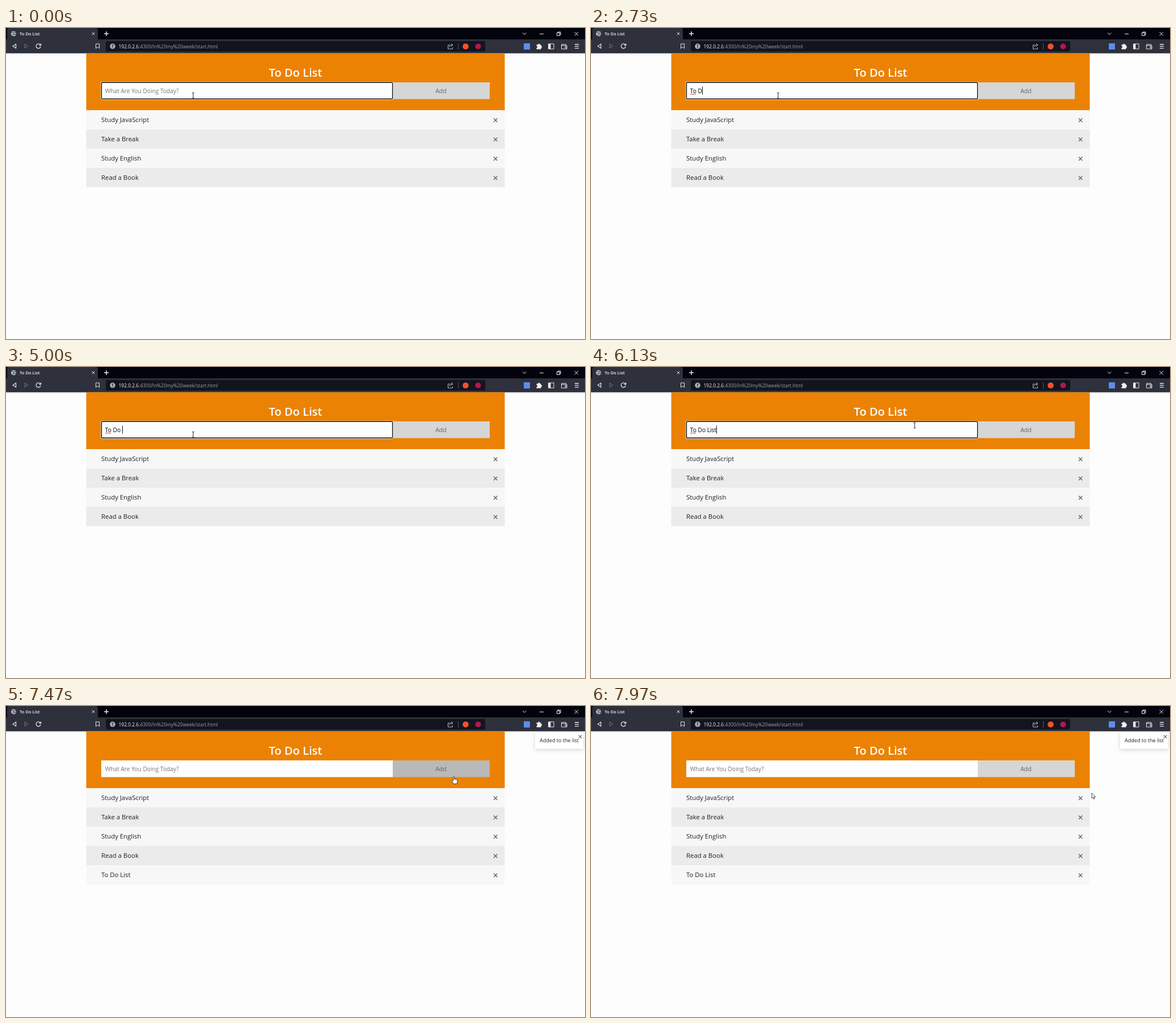
These frames come from a looping animation (1021x549 px, 8000 ms). An HTML page:

```html
<!DOCTYPE html>
<html lang="en">
<head>
<meta charset="utf-8">
<title>To Do List</title>
<style>
  html, body { margin: 0; width: 100%; height: 100%; overflow: hidden; background: #fdfdfd; }
  svg { display: block; width: 100%; height: 100%; font-family: "Open Sans", "Noto Sans", sans-serif; }
  text { white-space: pre; }
  .line { fill: none; stroke: #e8e8ec; stroke-width: 1; }
  .item { font-size: 11.35px; fill: #202124; }
  .field { font-size: 10.2px; }
  .cross { fill: none; stroke: #666; stroke-width: 1.4; }
  .hint { fill: #757575; }
</style>
</head>
<body>
<svg viewBox="0 0 1021 549">
  <defs>
    <clipPath id="page"><rect y="45" width="1021" height="504"/></clipPath>
    <filter id="shade" x="-20%" y="-40%" width="140%" height="200%">
      <feDropShadow dx="0" dy="2" stdDeviation="3" flood-color="#555" flood-opacity=".25"/>
    </filter>
  </defs>
  <rect width="1021" height="549" fill="#fdfdfd"/>

  <g id="chrome">
    <rect width="1021" height="21" fill="#02030d"/>
    <path d="M2 20V4q0-4 4-4H158q4 0 4 4V20Z" fill="#2e303c"/>
    <rect y="20" width="1021" height="24.7" fill="#2e303c"/>
    <rect x="176" y="23" width="669" height="18.5" rx="2" fill="#13151e"/>
    <circle cx="13.5" cy="10" r="4.6" fill="#c4c6cb"/>
    <path d="M10 8l3 .5 1 2-2 1.500 0 2M14 6l1 2 3 .5M15 13l1-2 2 0" fill="none" stroke="#50535d" stroke-width="1.300"/>
    <text x="24" y="13" font-size="7.6" font-weight="600" fill="#f4f4f6">To Do List</text>
    <path class="line" d="M151.700 7.700l4.600 4.600m0-4.600l-4.600 4.600" stroke-width="1.200"/>
    <path class="line" d="M177 6v8m-4-4h8" style="stroke-width:1.500"/>
    <path class="line" d="M911 8.500l3.200 3 3.200-3M941 10.500h7M1002.500 7l6.500 6.500m0-6.500l-6.500 6.500"/>
    <path class="line" d="M971.500 8.500h5v5h-5ZM973 8.500v-1.500h5v5h-1.500"/>
    <path class="line" d="M17.500 28.300v7.400l-5.500-3.700Z" style="stroke-width:1.200"/>
    <path class="line" d="M33 28.300v7.400l5.500-3.700Z" style="stroke:#777a84"/>
    <path class="line" d="M60.300 29.500a4 4 0 1 0 .7 3.500M61.500 27.500v3h-3" style="stroke-width:1.300"/>
    <path class="line" d="M158.500 28h6v8l-3-2.500-3 2.500Z"/>
    <circle cx="188" cy="32.300" r="4.800" fill="#a9abb3"/>
    <path d="M188 29.300v3.700m0 1v1.200" stroke="#13151e" stroke-width="1.300"/>
    <text x="198.500" y="35.500" font-size="8.45" fill="#f1f1f4">192.0.2.6<tspan fill="#9c9ea6">:4300/In%20my%20week/start.html</tspan></text>
    <path class="line" d="M783 30h-3.500v7h8v-3M782 34c0-3 2-4 5-4m-2-2.500l3 2.500-3 2.500" style="stroke:#b9bac1"/>
    <path d="M797.500 27v11" stroke="#555863"/>
    <circle cx="810.500" cy="32.500" r="5.300" fill="#f4512c"/>
    <circle cx="832.500" cy="32.500" r="5" fill="#b5174f"/>
    <rect x="913" y="27" width="11" height="11" rx="1" fill="#5b8def"/>
    <path d="M935.500 29.500h2.500a1.700 1.700 0 1 1 3.400 0h2.100v2.200a1.700 1.700 0 1 1 0 3.400v2.400h-8v-2.500a1.600 1.600 0 1 0 0-3.200Z" fill="#f2f2f4"/>
    <path class="line" d="M956.500 28h9.500v9h-9.500Z"/>
    <path d="M956.500 28h4v9h-4Z" fill="#e8e8ec"/>
    <path class="line" d="M979.500 29h8v2h1.500v6h-9.500ZM979.500 31h8M989 33h-3v2.200h3"/>
    <path class="line" d="M1003 29h7M1003 32.300h7M1003 35.600h7" style="stroke-width:1.300"/>
  </g>

  <g id="header">
    <rect x="141.500" y="44.700" width="738" height="100.300" fill="#eb8203"/>
    <text x="510.500" y="86" font-size="20.100" font-weight="600" text-anchor="middle" fill="#fff">To Do List</text>
    <rect x="168" y="96" width="514" height="29.500" fill="#fefefe"/>
    <rect id="button" x="682" y="96" width="171" height="29.500"/>
    <text x="767" y="114.700" font-size="10.600" text-anchor="middle" fill="#666">Add</text>
    <g id="ring" fill="none">
      <rect x="167.300" y="95.300" width="515.400" height="31" rx="2" stroke="#fff"/>
      <rect x="168.400" y="96.300" width="513.200" height="28.900" rx="1.500" stroke="#101010" stroke-width="1.400"/>
    </g>
    <text id="typed" class="field" x="174.800" y="114.700"></text>
    <path id="spell" d="M175 116.600l1 .6 1-.6 1 .6 1-.6 1 .6 1-.6 1 .6 1-.6 1 .6 1-.6" fill="none" stroke="#e0343c" stroke-width="1"/>
    <rect id="caret" y="103.500" width="1" height="14" fill="#111"/>
  </g>

  <g id="list"></g>

  <g clip-path="url(#page)">
    <g id="toast">
      <rect x="933" y="46" width="85" height="29.500" rx="1" fill="#fff" filter="url(#shade)"/>
      <text x="941" y="64" font-size="9.050" fill="#222">Added to the list</text>
      <path class="cross" d="M1009.800 51.500l5.600 5.600m0-5.600l-5.600 5.600" style="stroke-width:1.100"/>
    </g>
  </g>

  <g id="pointer">
    <path id="beam" d="M-2-4.500h1.500l.5.500.5-.5h1.500M0-4v8.500M-2 5h1.500l.5-.5.5.5h1.500" fill="none" stroke="#222"/>
    <path id="arrow" d="M0 0v9.500l2.200-2 1.500 3.300 1.500-.7-1.500-3.200h2.900Z" fill="#fff" stroke="#222" stroke-width=".8"/>
    <path id="hand" d="M-1.300 7V.8q0-1.100 1-1.100t1 1.100V4l1.500.2 1.500.4 1.300.5q1 .3 1 1.400v2.500l-1 3.500h-5.300l-3.400-4.500q-.5-1 .4-1.400t1.700.6Z" fill="#fff" stroke="#222" stroke-width=".9"/>
  </g>
</svg>
<script>
  const LOOP = 8000, PRESS = 6880, ADD = 7040;
  const $ = id => document.getElementById(id);
  const show = (id, on) => $(id).setAttribute("visibility", on ? "visible" : "hidden");

  const items = ["Study JavaScript", "Take a Break", "Study English", "Read a Book", "To Do List"];
  $("list").innerHTML = items.map((name, i) => {
    const y = 145 + i * 34;
    return `<g id="row${i}"><rect id="bg${i}" x="141.5" y="${y}" width="738" height="34"/>
      <text class="item" x="168" y="${y + 21}">${name}</text>
      <path class="cross" d="M860 ${y + 14.5}l6.400 6.400m0-6.400l-6.400 6.400"/></g>`;
  }).join("");

  // Time of each keystroke of "To Do List"
  const phrase = "To Do List";
  const keys = [600, 1000, 2050, 2400, 3430, 3650, 5300, 5500, 5680, 5840];

  // Pointer path: time, x, y
  const path = [
    [5900, 330, 119], [6130, 570, 103], [6270, 670, 82], [6430, 752, 104],
    [6640, 790, 125], [7510, 790, 125], [7620, 851, 152], [7680, 855, 153], [7800, 883, 153.5]
  ];

  function pointerAt(t) {
    let a = path[0];
    for (const b of path) {
      if (t < b[0]) {
        const k = b === a ? 0 : (t - a[0]) / (b[0] - a[0]);
        return [a[1] + (b[1] - a[1]) * k, a[2] + (b[2] - a[2]) * k];
      }
      a = b;
    }
    return [a[1], a[2]];
  }

  const inside = ([x, y], l, t, r, b) => x >= l && x < r && y >= t && y < b;

  function drawField(t) {
    const added = t >= ADD, focused = t < PRESS;
    const count = keys.filter(k => k <= t).length;
    const empty = added || !count;
    const typed = $("typed");
    typed.textContent = empty ? "What Are You Doing Today?" : phrase.slice(0, count);
    typed.setAttribute("class", empty ? "field hint" : "field item-text");
    show("ring", focused);
    show("spell", focused && count > 2);
    const since = t - (count ? keys[count - 1] : -500);
    const blink = focused && since % 1000 < 500;
    show("caret", blink);
    if (blink) $("caret").setAttribute("x", Math.round(174.8 + (empty ? 0 : typed.getComputedTextLength())));
  }

  function drawList(t, p) {
    items.forEach((_, i) => {
      const y = 145 + i * 34;
      const hover = inside(p, 141.5, y, 879.5, y + 34);
      $("bg" + i).setAttribute("fill", hover ? "#dededf" : i % 2 ? "#ebebeb" : "#f7f7f8");
    });
    show("row4", t >= ADD);
  }

  function drawToast(t) {
    const k = Math.min(Math.max((t - ADD) / 400, 0), 1);
    const ease = 1 - (1 - k) ** 3;
    $("toast").setAttribute("opacity", ease);
    $("toast").setAttribute("transform", `translate(0 ${-120 * (1 - ease)})`);
  }

  function drawPointer(p) {
    const onButton = inside(p, 682, 96, 853, 126);
    const onList = inside(p, 141.5, 145, 879.5, 315);
    const onField = inside(p, 168, 96, 682, 126);
    $("button").setAttribute("fill", onButton ? "#b9b9b9" : "#d6d6d6");
    $("pointer").setAttribute("transform", `translate(${p[0]} ${p[1]})`);
    show("beam", onField);
    show("hand", onButton || onList);
    show("arrow", !onField && !onButton && !onList);
  }

  function draw(now) {
    const t = (now - start) % LOOP;
    const p = pointerAt(t);
    drawField(t);
    drawList(t, p);
    drawToast(t);
    drawPointer(p);
  }

  const start = performance.now();
  function tick() {
    draw(performance.now());
    requestAnimationFrame(tick);
  }
  tick();
</script>
</body>
</html>
```
